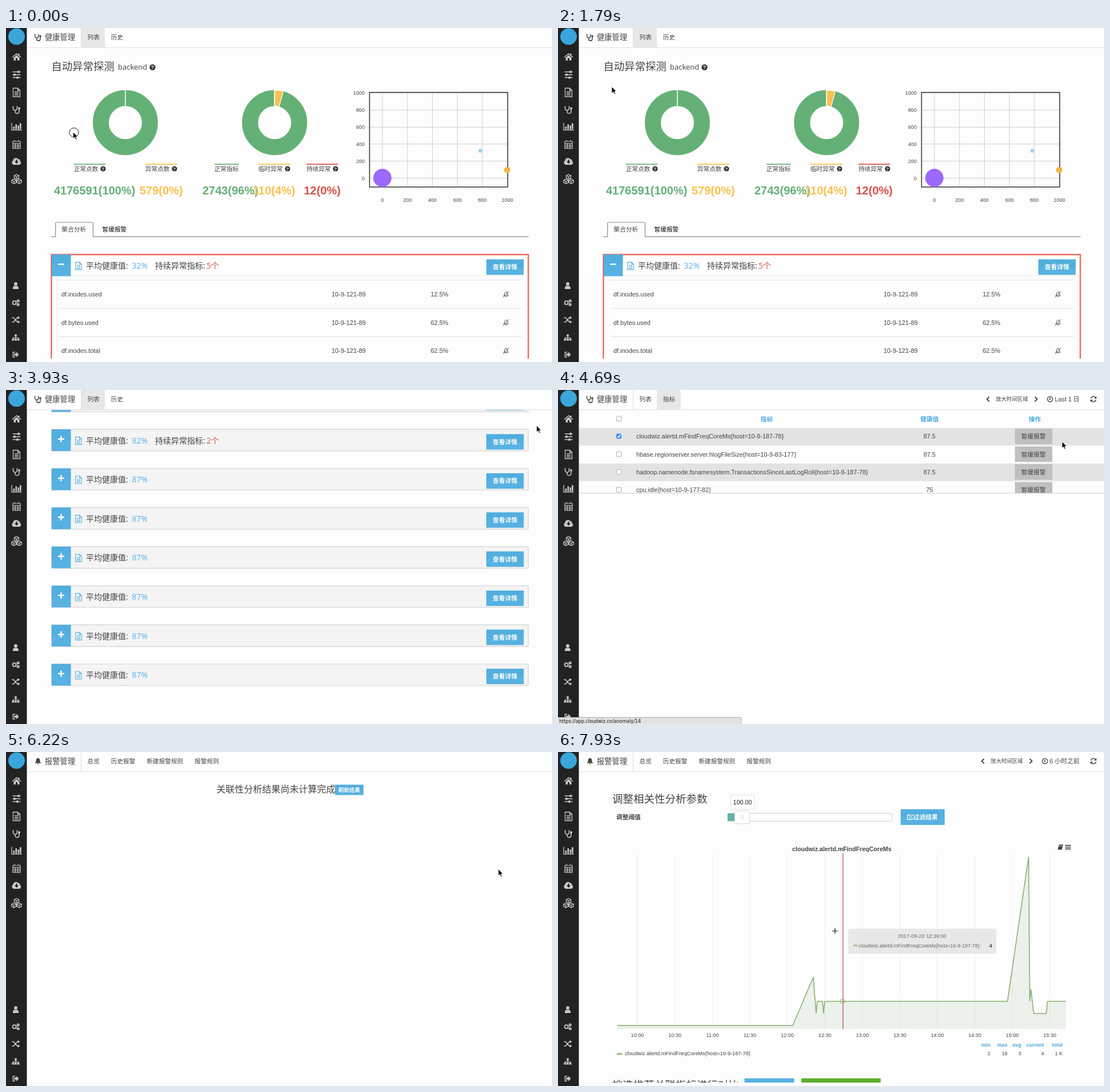
Recreate the animation shown at these times as an HTML page. Size 956 by 586 pixels, loop 8 s.

```html
<!DOCTYPE html>
<html lang="zh-CN">
<head>
<meta charset="utf-8">
<style>
html, body { margin: 0; width: 100%; height: 100%; overflow: hidden; background: #fdfdfd }
svg { display: block }
#stage { position: absolute; left: 0; top: 0 }
text { font-family: "Liberation Sans", "Noto Sans CJK SC", "Noto Sans CJK", sans-serif; fill: #444; white-space: pre }
.o { font-family: "Open Sans", "Noto Sans CJK SC", "Noto Sans CJK", sans-serif }
.d { font-family: "DejaVu Sans", sans-serif }
.b { font-weight: bold }
.m { text-anchor: middle }
.e { text-anchor: end }
.w { fill: #fff }
.blue { fill: #4ca9df }
</style>
</head>
<body>
<svg id="stage" width="956" height="586" viewBox="0 0 956 586"></svg>
<script>
const GREEN = '#64b077', YELLOW = '#fbc04d', RED = '#d9534a', BLUE = '#57b1e1', DARK = '#444';
const METRIC = 'cloudwiz.alertd.mFindFreqCoreMs', HOST = '{host=10-9-187-78}';

// y is the visual centre of the text
const T = (x, y, size, str, cls = '', fill = '') =>
  `<text x="${x}" y="${y + size * .36}" font-size="${size}" class="${cls}" ${fill && `style="fill:${fill}"`}>${str}</text>`;
const R = (x, y, w, h, fill, more = '') =>
  `<rect x="${x}" y="${y}" width="${w}" height="${h}" fill="${fill}" ${more}/>`;
const P = (d, stroke, w = 1, more = 'fill="none"') =>
  `<path d="${d}" stroke="${stroke}" stroke-width="${w}" ${more}/>`;
const C = (x, y, r, fill, more = '') => `<circle cx="${x}" cy="${y}" r="${r}" fill="${fill}" ${more}/>`;
const disc = (x, y, r) => `M${x - r} ${y}a${r} ${r} 0 1 0 ${2 * r} 0a${r} ${r} 0 1 0 ${-2 * r} 0z`;
const cube = (x, y) => `M${x} ${y - 4}l4 2v4l-4 2-4-2v-4zM${x - 4} ${y - 2}l4 2 4-2M${x} ${y}v4`;
const many = (list, f) => list.map(f).join('');

// icon: [stroke path, stroke width, fill path]
const ICONS = {
  home: ['', 0, 'M-8 0L0-7 3-4.4V-6H5V-2.6L8 0 7 1 0-5-7 1zM-5 1L0-3.5 5 1V6H1.5V2H-1.5V6H-5z'],
  sliders: ['M-7-5H7M-7 0H7M-7 5H7', 1.5, 'M2-7h3v4h-3zM-5-2h3v4h-3zM0 3h3v4h-3z'],
  file: ['M-6-7.5H2L6-3.5V7.5H-6zM2-7.5V-3.5H6M-3.5-1H3.5M-3.5 2H3.5M-3.5 4.7H3.5', 1.3, ''],
  scope: ['M-6-6v4a3.5 3.5 0 0 0 7 0v-4M-2.5 1.5v2a3.5 3.5 0 0 0 7 0v-4', 1.6, disc(4.5, -2, 2)],
  chart: ['M-8.5-6.5V6H9', 1.3, 'M-6 0h2.6v4.5h-2.6zM-2-4h2.6v8.5h-2.6zM2-2h2.6v6.5h-2.6zM5.6-6h2.6v10.5h-2.6z'],
  calendar: ['M-6.5-5H6.5V7.5H-6.5zM-6.5-1.5H6.5M-6.5 1.5H6.5M-6.5 4.5H6.5M-2.3-2V7.5M2.3-2V7.5M-3.5-7.5v3M3.5-7.5v3', 1.2, ''],
  cloud: ['', 0, 'M-5 6a4 4 0 0 1-1-7.5a5 5 0 0 1 9-2.5a3 3 0 0 1 3 3.5a3.5 3.5 0 0 1-1 6.5zM-1.2-3h2.4v3h2.3L0 4-3.5 0h2.3z'],
  cubes: [cube(0, -4) + cube(-4.6, 4) + cube(4.6, 4), 1.3, ''],
  user: ['', 0, disc(0, -3.2, 3.2) + 'M-5.5 6.5q0-6 3-6h5q3 0 3 6z'],
  cogs: [disc(-2.5, 0, 3.3) + disc(4.5, -3.5, 1.8) + disc(4.5, 3.5, 1.8), 2, ''],
  random: ['M-7-4H-4L3 4H5M-7 4H-4L3-4H5', 1.7, 'M4-7L8-4 4-1zM4 1L8 4 4 7z'],
  sitemap: ['M0-4V3M-5 3V.2H5V3', 1.2, 'M-2-6h4v4h-4zM-7 2h4v4h-4zM-2 2h4v4h-4zM3 2h4v4h-4z'],
  exit: ['M-1-4.5H-5V4.5H-1', 1.5, 'M-3-2H1V-5L6 0 1 5V2H-3z'],
  bell: ['', 0, 'M-6 4q2.5-2 2.5-6q0-3.5 3.5-4q3.5 .5 3.5 4q0 4 2.5 6zM-1.7 4.6h3.4q-1.7 3-3.4 0z'],
  mute: ['M-4.5 3q2-2 2-5q.3-2.6 2.5-3q2.2 .4 2.5 3q0 3 2 5zM-1 5h2M-6 6L6-6', 1.1, ''],
  clock: [disc(0, 0, 4.6) + 'M0-3V.5H-2', 1.3, ''],
  refresh: ['M-4.5-1a4.6 4.6 0 0 1 8-2M4.5 1a4.6 4.6 0 0 1-8 2', 1.5, 'M5.3-5.3v4.3h-4.3zM-5.3 5.3v-4.3h4.3z'],
  left: ['M2-4L-2 0 2 4', 1.9, ''],
  right: ['M-2-4L2 0-2 4', 1.9, ''],
  edit: ['M3 1V4.5H-5V-3.5H1M-2 2L4.5-4', 1.4, ''],
  book: ['', 0, 'M-2-4.5H5L2.5 4.5H-4.5L-4 2zM-1-2.5l-.4 1h4l.4-1z'],
  bars: ['M-5-3.2H5M-5 0H5M-5 3.2H5', 1.7, '']
};
const icon = (name, x, y, col = DARK, k = 1) => {
  const [s, w, f] = ICONS[name];
  return `<g transform="translate(${x} ${y}) scale(${k})">${P(s, col, w)}<path d="${f}" fill="${col}" fill-rule="evenodd"/></g>`;
};
const help = (x, y, r = 4.6) => C(x, y, r, '#333') + T(x, y, r * 1.7, '?', 'b m w');
const button = (x, y, w, h, str, size = 10.7) =>
  R(x, y, w, h, BLUE) + R(x, y, w, h / 2, '#4fabdc', 'opacity=".5"') + T(x + w / 2, y + h / 2, size, str, 'b m w');

// sidebar
const SIDE = [['home', 51, '首页'], ['sliders', 82, '系统概览'], ['file', 113, '日志查询'], ['scope', 143, '健康管理'],
  ['chart', 173, '仪表盘'], ['calendar', 204, '值班日历'], ['cloud', 234, '安装指南'], ['cubes', 265, '服务管理'],
  ['user', 452, '个人中心'], ['cogs', 482, '设置'], ['random', 512, '切换组织'], ['sitemap', 543, '组织管理'], ['exit', 573, '退出']];
const sidebar = R(0, 0, 36.5, 586, '#222') + C(18.5, 15, 14.5, '#3aa6db') +
  many(SIDE, ([n, y]) => icon(n, n == 'user' || n == 'cogs' || y > 500 ? 17 : 18.5, y, '#c9c9c9', y > 400 ? .93 : 1)) +
  `<svg id="menu" x="36" width="0" height="586">${R(0, 0, 115, 586, '#222')}${many(SIDE, ([, y, s]) => T(12, y, 11, s, '', '#ccc'))}</svg>`;

// page header: active tab shaded
function header(ico, title, tabs, active, time, shift = 0) {
  let x = 142.5, s = R(36.5, 0, 920, 34.5, '#fefefe') + P('M36 34.7H956', '#ddd');
  tabs.forEach((tab, i) => {
    const w = tab.length * 10.65;
    if (i == active) s += R(x - 10.5, 0, w + 20, 34.3, '#e7e7e7');
    s += T(x, 16, 10.65, tab);
    x += w + 20;
  });
  s += P('M131.7 0V34', '#ddd') + icon(ico, 56, 16, DARK, .9) + T(68, 16, 13.3, title);
  if (time) s += icon('left', 753 - shift, 16) + T(766.5 - shift, 16, 9.4, '放大时间区域') + icon('right', 837 - shift, 16) +
    icon('clock', 861.5 - shift, 16) + T(913, 16, 10.8, time, 'e') + icon('refresh', 937.5, 16);
  return s;
}

// health list
function donut(x, deg) {
  const a = deg * Math.PI / 180, at = (r, a) => `${x + r * Math.sin(a)} ${166 - r * Math.cos(a)}`;
  let s = C(x, 166, 43, 'none', `stroke="${GREEN}" stroke-width="28"`);
  if (deg) s += P(`M${at(57, 0)}A57 57 0 0 1 ${at(57, a)}L${at(29, a)}A29 29 0 0 0 ${at(29, 0)}z`, '#fff', 1.3, `fill="${YELLOW}"`);
  return s + P(`M${x} 108V138`, '#fff', 1.6);
}
const stat = (x, w, col, name, nx, value) => R(x, 238.2, w, 1.7, col) + T(x, 247, 10.6, name) +
  (w > 50 ? help(x + 51, 247) : '') + T(nx, 285, 20, value, 'b', col);

function scatter() {
  const xs = [659, 703, 746.5, 790.5, 834, 878], ys = [263.5, 233.5, 203.5, 174, 144, 114];
  return many(xs, (x, i) => P(`M${x} 113V279`, '#ccc') + T(x, 302, 9, i * 200, 'm')) +
    many(ys, (y, i) => P(`M636 ${y}H878`, '#ccc') + T(628, y, 9, i * 200, 'e')) +
    P('M636.5 113H878.5V279H636.5z', '#333', 1.5) +
    C(659, 263, 16, '#9b69fd') + C(877.5, 249, 5.5, '#e9b93f') + C(830.5, 215.3, 3.5, '#a9d3f0');
}
function group(y, health, bad, open) {
  const box = open ? R(79.5, y, 835, 304, '#fdfdfd', 'stroke="#f4b0a8" stroke-width="3"') + P(`M79.5 ${y}H914.5V${y + 304}H79.5z`, '#e4584b', 1.3)
    : R(79.5, y, 835, 38, '#f4f4f4', 'stroke="#d9d9d9" stroke-width="1.4" rx="1"');
  return box + R(80, y, 33.5, 38, BLUE) + R(80, y, 33.5, 19, '#4fabdc', 'opacity=".5"') +
    P(`M91 ${y + 17}h11` + (open ? '' : `m-5.5-5.5v11`), '#fff', 2.4) + icon('file', 127, y + 20, BLUE, .88) +
    T(140, y + 19.5, 14, '平均健康值:', 'o') + T(220.5, y + 19.5, 14, health + '%', 'o', '#56b0ef') +
    (bad ? T(261, y + 19.5, 14, '持续异常指标:', 'o') + T(351, y + 19.5, 14, bad + '个', 'o', RED) : '') +
    button(841, y + 8.5, 65.5, 27, '查看详情');
}
const ROW = 49.6, ROW_TOP = 442;
const rows = [['used', 'inodes', 12.5], ['used', 'bytes', 62.5], ['total', 'inodes', 62.5], ['total', 'bytes', 62.5], ['free', 'bytes', 75]];
const list = donut(209, 0) + donut(470.3, 15.5) +
  T(79.5, 67, 18.4, '自动异常探测') + T(196, 68.5, 13, 'backend', 'o') + help(256.5, 69, 5.2) +
  stat(119, 55.5, GREEN, '正常点数', 84, '4176591(100%)') + stat(244, 56, YELLOW, '异常点数', 234, '579(0%)') +
  stat(365, 43, GREEN, '正常指标', 344, '2743(96%)') + stat(442, 56, YELLOW, '临时异常', 432, '110(4%)') +
  stat(526, 55.5, RED, '持续异常', 521.5, '12(0%)') + scatter() +
  P('M79 366.2H86.7V343q0-2 2-2H150.5q2 0 2 2V366.2H915', '#888', 1.2) +
  T(97.5, 353.5, 10.7, '聚合分析') + T(168.5, 353.5, 10.7, '暂缓报警', '', '#111') +
  group(397.5, 32, 5, true) + P('M114 434.7H914', '#e6e6e6') +
  many(rows, ([kind, unit, v], i) => {
    const y = ROW_TOP + ROW * i, c = y + 25.2;
    return P(`M91 ${y + .3}H903`, '#ddd') + T(97, c, 10.9, `df.${unit}.${kind}`) + T(570, c, 11, '10-9-121-89') +
      T(759, c, 11, v + '%', 'm') + icon('mute', 875.5, c, DARK, .9);
  }) + R(91.5, 0, 811, ROW, 'none', 'id="hover" stroke="#b9dcec"') +
  many([[68, 3], [82, 2], [87], [87], [87], [87], [87], [87]], ([h, bad], i) => group(730.4 + 68.6 * i, h, bad));

// metric chart, values on a 1.7 .. 16.3 scale
const DATA = [[104, 2], [411, 2], [447, 6], [452, 3], [454, 4], [463, 4], [465, 3], [467, 4], [787, 4], [824, 16], [826, 4], [828, 5], [833, 3], [855, 3], [857, 4], [889, 4]];
function valueAt(x) {
  const i = Math.max(1, DATA.findIndex(p => p[0] >= x)), [a, u] = DATA[i - 1], [b, v] = DATA[i];
  return u + (v - u) * (x - a) / (b - a);
}
const LINE = '#82ae6c';
function chart(top, bottom) {
  const k = (bottom - top) / 308 * 21.15, y = v => bottom + 1.706 * k - v * k;
  const d = 'M' + DATA.map(([x, v]) => x + ' ' + y(v)).join('L');
  const hours = [...Array(12).keys()];
  return T(497, top - 7.5, 10.65, METRIC, 'b m') + icon('book', 879.5, top - 11) + icon('bars', 893, top - 11) +
    many(hours, i => P(`M${139 + 65.65 * i} ${top}V${bottom}`, '#eee') +
      T(139 + 65.65 * i, bottom + 11, 9.1, `${10 + (i >> 1)}:${i % 2 ? 30 : '00'}`, 'm')) +
    `<path d="${d}V${bottom}H104z" fill="#7a9a68" opacity=".12"/>` + P(d, LINE, 1.5) +
    R(103, bottom + 42.5, 9.5, 2.4, LINE) + T(117, bottom + 43, 9.24, METRIC + HOST) +
    many([[757, 'min', 2], [787, 'max', 16], [811, 'avg', 3], [851, 'current', 4], [883.5, 'total', '1 K']], ([x, n, v]) =>
      T(x, bottom + 28, 9, n, 'b e blue') + T(x, bottom + 43, 9, v, 'e'));
}

// metric table
const check = (y, on) => on ? R(102, y - 4.5, 9, 9, '#3b8df5', 'rx="2"') + P(`M104 ${y}l2 2.3 3.3-4.8`, '#fff', 1.4)
  : R(102.5, y - 4, 8.5, 8.5, '#fff', 'rx="1.5" stroke="#aaa"');
const table = check(50, false) + T(365.5, 51, 10.7, '指标', 'b m blue') + T(650.5, 51, 10.7, '健康值', 'b m blue') + T(835, 51, 10.7, '操作', 'b m blue') +
  `<svg width="956" height="181">${many([[METRIC + HOST, 87.5], ['hbase.regionserver.server.hlogFileSize{host=10-9-83-177}', 87.5],
    ['hadoop.namenode.fsnamesystem.TransactionsSinceLastLogRoll' + HOST, 87.5], ['cpu.idle{host=10-9-177-82}', 75]], ([n, v], i) => {
    const y = 81.5 + 31.2 * i;
    return (i % 2 ? '' : R(36.5, y - 15, 920, 31, '#e3e3e3')) + check(y - .5, !i) + T(137, y, 10.85, n) + T(650.5, y, 10.8, v, 'm') +
      R(800, y - 13.7, 65.5, 27.3, '#bfbfbf') + T(832.5, y, 10.7, '暂缓报警', 'm');
  })}</svg>` + P('M36.5 181H956', '#ccc');

const params = T(95, 82, 18.5, '调整相关性分析参数') + T(102, 114.5, 10.7, '调整阈值', 'b') +
  R(302.5, 75.5, 41, 25, '#fff', 'rx="2" stroke="#ddd"') + T(323, 88, 10.8, '100.00', 'm', '#222') +
  R(297, 107.5, 288, 14, '#fff', 'rx="2.5" stroke="#ccc"') + R(297, 108, 14, 13, '#66b0ac') +
  R(309, 104.5, 27, 22, '#ddd', 'rx="3"') + R(309.5, 103.5, 26, 22, '#fff', 'rx="3" stroke="#ddd"') +
  P('M321 110v9M324 110v9', '#ddd') + button(600, 100.5, 77, 27.5, '') + icon('edit', 617, 114, '#fff') + T(622, 114, 10.7, '过滤结果', 'b w');
const pick = T(95, 584, 18.5, '挑选推荐关联指标进行对比') + R(326.5, 572.5, 87, 27.5, BLUE) + R(426, 572.5, 139, 27.5, '#5cb02c');

const ALERTS = ['总览', '历史报警', '新建报警规则', '报警规则'];
const layer = (id, s) => `<g id="${id}">${s}</g>`;
const stage = document.getElementById('stage');
stage.innerHTML = `<clipPath id="view"><rect x="36" y="35" width="920" height="545"/></clipPath>` + R(0, 0, 956, 586, '#fdfdfd') +
  layer('health', `<g clip-path="url(#view)">${layer('list', list)}</g>` + header('scope', '健康管理', ['列表', '历史'], 0)) +
  layer('detail', header('scope', '健康管理', ['列表', '指标'], 1, 'Last 1 日')) +
  layer('table', table) + layer('small', chart(214, 330)) +
  layer('alert', header('bell', '报警管理', ALERTS, -1)) +
  layer('pending', T(368.5, 65.5, 16, '关联性分析结果尚未计算完成') + button(576, 57.5, 50, 18, '刷新结果', 9.5)) +
  layer('result', header('bell', '报警管理', ALERTS, -1, '6 小时之前', 9) + params + `<g clip-path="url(#view)">${layer('pick', pick)}</g>`) +
  layer('big', chart(178, 486)) + layer('tip', '') + sidebar +
  layer('link', R(-1, 574.5, 322, 13, '#e2e2e2', 'stroke="#aaa" rx="2"') + T(2, 580.8, 8, 'https://app.cloudwiz.cn/anomaly/14', 'd', '#111')) +
  layer('pointer', layer('ring', C(1.5, .8, 8, 'none', 'stroke="#222"')) +
    layer('arrow', P('M0 0V11.5L2.7 9.1L4.6 13.3L6.5 12.5L4.7 8.4H8.2z', '#fff', .8, 'fill="#000"')) +
    layer('cross', P('M-5 0H5M0-5V5', '#111', 1.2)));

// pointer moves: start, end, steps, x, y
const MOVES = [[350, 870, 10, 8, 140], [1050, 1490, 7, 100, 136], [1730, 1790, 2, 94, 103], [1850, 2490, 11, 268.5, 541.5],
  [3480, 0, 1, 320, 465], [3930, 0, 1, 929, 62.5], [3990, 4220, 4, 882.5, 90.5], [5190, 5570, 7, 866, 166], [5720, 0, 1, 858, 206],
  [5860, 0, 1, 862, 205.5], [7270, 0, 1, 856, 206], [7410, 0, 1, 735, 240], [7500, 0, 1, 590, 275], [7590, 0, 1, 555, 290], [7730, 7930, 4, 485, 314]];
function pointerAt(t) {
  let x = 117.5, y = 182.5;
  for (const [a, b, n, tx, ty] of MOVES) {
    if (t < a) break;
    const step = n == 1 ? 1 : Math.min(n, 1 + Math.floor((t - a) * (n - 1) / (b - a) + .001)) / n;
    const p = 1 - (1 - step) ** 1.16;
    x += (tx - x) * p;
    y += (ty - y) * p;
  }
  return [x, y];
}
function tip(t, x, y) {
  const lx = pointerAt(t - 66.7)[0], left = x + 283 > 889 ? x - 283 : x + 23, top = y - 4;
  const min = Math.ceil((x - 139) / 2.188), clock = `${10 + Math.floor(min / 60)}:${String(min % 60).padStart(2, '0')}:00`;
  return P(`M${lx} 178V486`, '#b9474a', 1.2) + C(lx - 1, 522.1 - 21.15 * valueAt(lx - 1), 4, 'none', `stroke="${LINE}" stroke-width="1.5" opacity=".7"`) +
    R(left, top, 259.5, 44, '#e7e7e7', 'rx="4" opacity=".95"') + T(left + 129.5, top + 13, 9.2, '2017-09-20 ' + clock, 'm', '#666') +
    R(left + 9, top + 28.5, 7.5, 2, LINE) + T(left + 18.5, top + 30, 8.9, METRIC + HOST + ':', '', '#666') +
    T(left + 252, top + 30, 9.2, Math.round(valueAt(x)), 'b e');
}

const el = {};
stage.querySelectorAll('[id]').forEach(e => el[e.id] = e);
const show = (id, on) => el[id].style.display = on ? '' : 'none';
const move = (id, x, y) => el[id].setAttribute('transform', `translate(${x} ${y})`);

function draw(t) {
  const within = (a, b) => t >= a && t < b;
  const [x, y] = pointerAt(t);
  const scroll = t < 2910 ? 0 : t < 2970 ? 21.4 : t < 3150 ? 260 : 730;
  const row = Math.floor((y + scroll - ROW_TOP) / ROW);
  show('health', t < 4510);
  move('list', 0, -scroll);
  show('hover', x > 91 && x < 903 && row >= 0 && row < 5);
  el.hover.setAttribute('y', ROW_TOP + ROW * row);
  el.menu.setAttribute('width', within(1050, 1730) ? 115 * Math.min(1, (t - 990) / 240) : 0);
  show('detail', within(4510, 6160));
  show('table', within(4630, 6160));
  show('small', within(5190, 6160));
  show('alert', within(6160, 6580));
  show('pending', within(6220, 6580));
  show('result', t >= 6580);
  move('pick', 0, t < 6730 ? -293 : 0);
  show('big', t >= 6730);
  el.tip.innerHTML = t >= 7410 ? tip(t, x, y) : '';
  show('link', within(4220, 5720));
  move('pointer', x, y);
  show('pointer', !within(3630, 3930));
  show('ring', t < 50);
  show('arrow', t < 6730);
  show('cross', t >= 6730);
}
const start = performance.now();
function tick() {
  draw((performance.now() - start) % 8000);
  requestAnimationFrame(tick);
}
tick();
</script>
</body>
</html>
```
